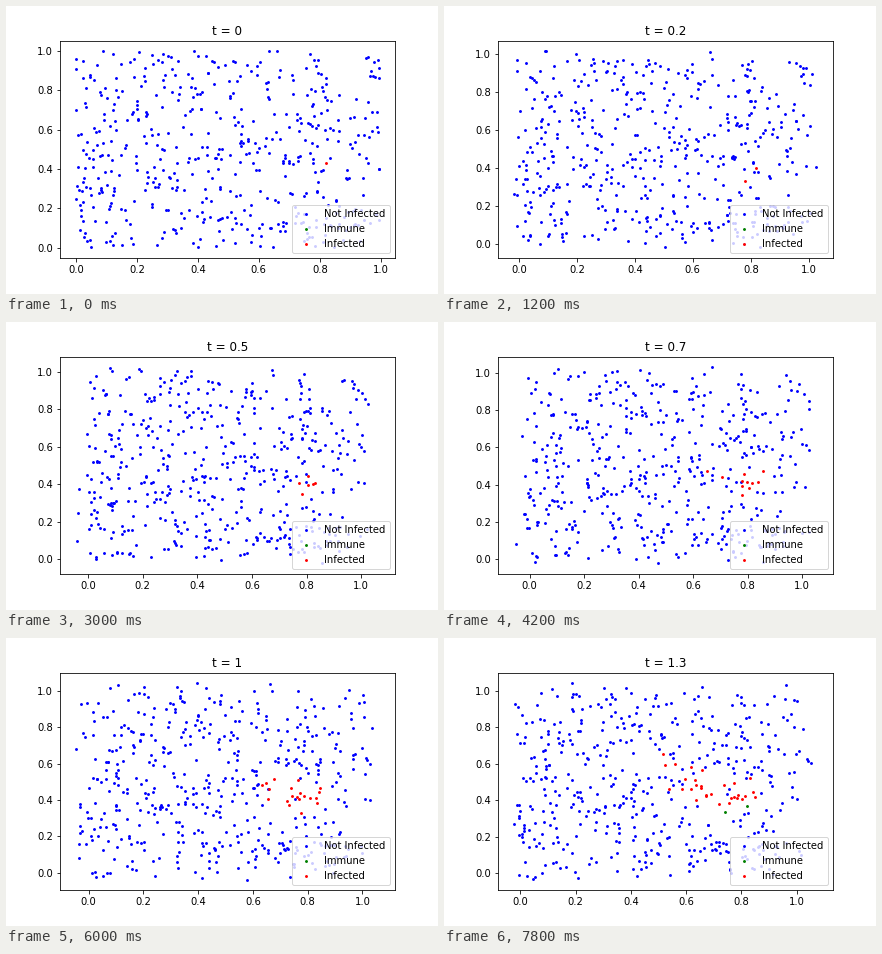
These frames come from a looping animation (432x288 px, 8 s). A matplotlib script:

```python
import numpy as np
import matplotlib.pyplot as plt
from matplotlib.animation import FuncAnimation

COUNT, CASES = 500, 32
STEPS, HOLD = 14, 3
STRIDE = 0.012
RECOVERY = 1.05

rng = np.random.default_rng(12)
times = np.arange(STEPS) / 10
end = times[-1]
keys = [0, 0.2, 0.5, 0.7, 0.9, 1.1, 1.3]


def tween(*values):
    return np.interp(times, keys, values)


# Axis limits follow the spread of the crowd.
x_lo = tween(-0.052, -0.072, -0.103, -0.116, -0.114, -0.095, -0.081)
x_hi = tween(1.046, 1.083, 1.123, 1.113, 1.109, 1.128, 1.131)
y_lo = tween(-0.053, -0.072, -0.079, -0.081, -0.09, -0.098, -0.093)
y_hi = tween(1.053, 1.073, 1.081, 1.088, 1.096, 1.102, 1.099)


def bounce(p, lo, hi):
    """Fold positions back inside the extent the axis limits imply."""
    pad = (hi - lo) / 22
    lo, hi = (lo + pad)[:, None], (hi - pad)[:, None]
    p = lo + np.abs(p - lo)
    return hi - np.abs(hi - p)


def outbreak():
    """Infection times, and places on a trail that spreads to the left."""
    caught = end * (np.arange(CASES) / (CASES - 1)) ** 0.55
    reach = 0.27 * caught * np.sqrt(rng.random(CASES))
    x = 0.845 - reach
    y = 0.39 + 0.4 * reach + rng.normal(0, 0.065 - 0.12 * reach)
    x[0], y[0] = 0.82, 0.43
    return caught, np.column_stack([x, y])


def bystanders(n):
    """Scattered people who keep clear of the outbreak."""
    x, y = rng.random((2, 2 * n))
    x = x ** 1.1
    near = (x > 0.6) & (x < 0.88) & (y > 0.29) & (y < 0.52)
    return np.column_stack([x, y])[~near][:n]


caught, sick_at = outbreak()
caught = np.append(caught, np.full(COUNT - CASES, np.inf))
cured = caught + RECOVERY

steps = rng.normal(0, STRIDE, (STEPS, COUNT, 2))
steps[0] = np.vstack([sick_at, bystanders(COUNT - CASES)])
people = steps.cumsum(axis=0)
people[..., 0] = bounce(people[..., 0], x_lo, x_hi)
people[..., 1] = bounce(people[..., 1], y_lo, y_hi)

fig, ax = plt.subplots(figsize=(6, 4), dpi=72)
fig.subplots_adjust(left=0.125, right=0.9, bottom=0.125, top=0.88)
groups = [ax.scatter([], [], s=2, color=c, linewidths=1.5, label=name)
          for c, name in (("b", "Not Infected"), ("g", "Immune"),
                          ("r", "Infected"))]
ax.legend(loc="lower right")
title = ax.set_title("t = 0")
ticks = np.arange(6) / 5
ax.set_xticks(ticks)
ax.set_yticks(ticks)


def draw(frame):
    k = frame // HOLD
    now = times[k] + 1e-6
    immune = cured <= now
    sick = (caught <= now) & ~immune
    for dots, mask in zip(groups, (~sick & ~immune, immune, sick)):
        dots.set_offsets(people[k][mask])
    ax.set_xlim(x_lo[k], x_hi[k])
    ax.set_ylim(y_lo[k], y_hi[k])
    title.set_text(f"t = {times[k]:g}")
    return [*groups, title]


anim = FuncAnimation(fig, draw, frames=40, interval=200, repeat=True,
                     repeat_delay=0, blit=False)
plt.show()
```
